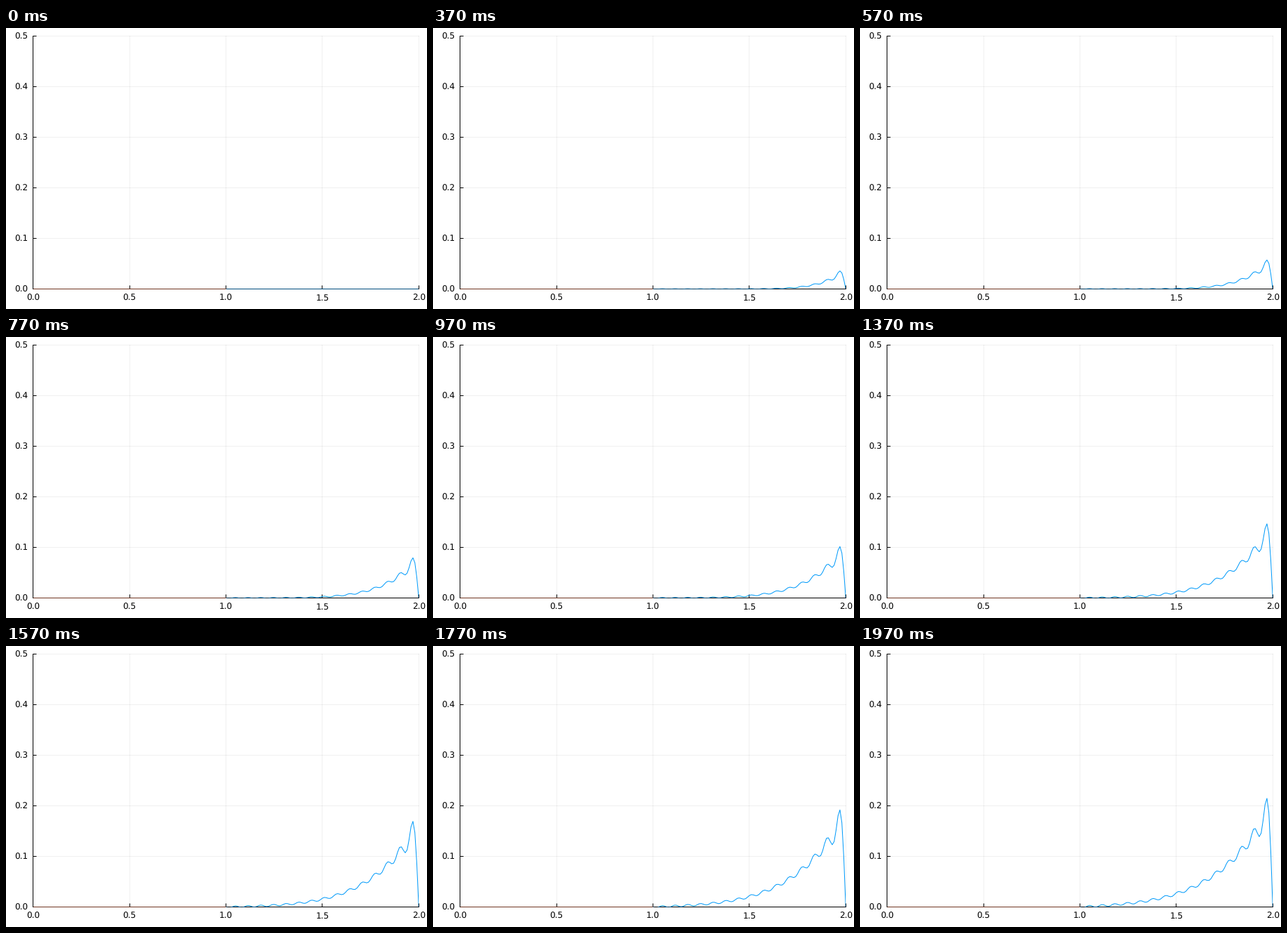
These frames come from a looping animation (600x400 px, 2010 ms). A matplotlib script:

```python
import numpy as np
import matplotlib.pyplot as plt
from matplotlib.animation import FuncAnimation
from matplotlib.path import Path
from matplotlib.transforms import ScaledTranslation

DPI = 100
PX = 72 / DPI              # one pixel in points
W, H = 600, 400
LEFT, RIGHT, TOP, BOTTOM = 38.4, 587.8, 11.4, 371.4

STEPS = 60                 # poses in one loop, 30 per second
T_END = 2.0
RATE = 0.1                 # growth of the boundary value at x = 2
DIFFUSIVITY = 0.0555
TERMS = 30

plt.rcParams.update({
    "font.family": "DejaVu Sans",
    "font.size": 12 * PX,
    "text.hinting": "none",
    "path.simplify": False,
})

x = np.linspace(1, 2, 101)
n = np.arange(1, TERMS + 1)
decay = DIFFUSIVITY * (n * np.pi) ** 2
weight = 2 * (-1.0) ** (n + 1) / (n * np.pi)
modes = np.sin(np.pi * np.outer(x - 1, n))


def heat(t):
    """Truncated sine series for a bar whose right end warms linearly."""
    lag = (1 - np.exp(-decay * t)) / decay
    return modes @ (weight * RATE * (t - lag))


fig = plt.figure(figsize=(W / DPI, H / DPI), dpi=DPI, facecolor="white")
ax = fig.add_axes([LEFT / W, 1 - BOTTOM / H,
                   (RIGHT - LEFT) / W, (BOTTOM - TOP) / H])
ax.set(xlim=(0, 2), ylim=(0, 0.5),
       xticks=np.arange(5) / 2, yticks=np.arange(6) / 10)
ax.xaxis.set_major_formatter("{x:.1f}")
ax.yaxis.set_major_formatter("{x:.1f}")
ax.tick_params(direction="in", length=5 * PX, width=PX, pad=7.5 * PX)
ax.tick_params(axis="y", pad=7 * PX)
ax.grid(color="black", alpha=0.06, linewidth=PX, clip_on=False)
ax.set_axisbelow(True)
ax.spines[["top", "right"]].set_visible(False)
ax.spines[["left", "bottom"]].set_linewidth(PX)

# axis lines snap to whole pixels; curves and x labels line up with them
nudge = ScaledTranslation(0.4 / DPI, -0.1 / DPI, fig.dpi_scale_trans)
for label in ax.get_xticklabels():
    label.set_transform(label.get_transform() + nudge)


def add_curve(xs, ys, color):
    """Thin line over the axes, cut off smoothly at the plot's edge."""
    line, = ax.plot(xs, ys, color=color, linewidth=PX, snap=False, zorder=3,
                    transform=ax.transData + nudge)
    line.set_clip_box(None)
    line.set_clip_path(Path.unit_rectangle(), ax.transAxes + nudge)
    return line


curve = add_curve(x, heat(0), "#009AFA")
add_curve([0, 1], [0, 0], "#E26F46")


def update(tick):
    # ticks are 10 ms; poses change on rounded thirtieths of a second
    step = min((6 * tick + 3) // 20, STEPS - 1)
    curve.set_ydata(heat(T_END * step / (STEPS - 1)))
    return curve,


anim = FuncAnimation(fig, update, frames=201, interval=10,
                     repeat=True, repeat_delay=0)
plt.show()
```
